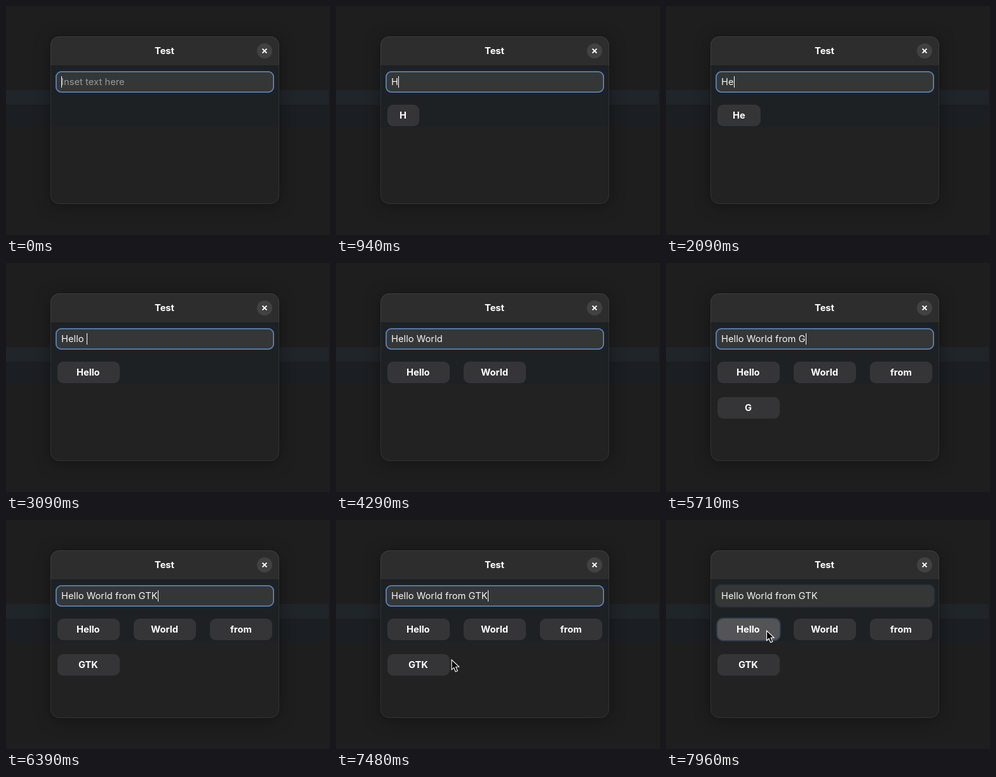
Write an HTML page with a canvas that moves like this. It is 510 px wide and 362 px high and loops after 8000 ms.

```html
<!DOCTYPE html>
<html lang="en">
<head>
<meta charset="utf-8">
<title>Test</title>
<style>
  html, body { margin: 0; width: 100%; height: 100%; overflow: hidden; background: #1e1e1e; }
  canvas { display: block; }
</style>
</head>
<body>
<canvas id="stage" width="510" height="362"></canvas>
<script>
const ctx = document.getElementById('stage').getContext('2d');
const LOOP = 8000;
const FONT = '14.67px Inter, "Noto Sans", sans-serif';
const BOLD = 'bold ' + FONT;

// Typing comes in bursts of evenly paced keys
const BURSTS = [
  { keys: 'H', start: 890, pace: 1 },
  { keys: 'ello ', start: 2090, pace: 195 },
  { keys: 'World', start: 3250, pace: 215 },
  { keys: ' fro', start: 4610, pace: 105 },
  { keys: 'm ', start: 5230, pace: 220 },
  { keys: 'GTK', start: 5710, pace: 205 },
];
const BLINKS = [30, 1720, 3980, 6390];
const BLINK_STEP = 300;
const POINTER_IN = 7300, HOVER = 7580, CLICK = 7830;

const clamp = v => Math.max(0, Math.min(1, v));
const ramp = (t, start, length) => clamp((t - start) / length);

function typedAt(t) {
  return BURSTS.map(({ keys, start, pace }) =>
    keys.slice(0, Math.max(0, Math.floor((t - start) / pace) + 1))).join('');
}

// Fade out, stay hidden, fade in, stay visible; a new burst shows the cursor again
function cursorAlpha(t) {
  if (t > CLICK + 20) return 0;
  const blink = BLINKS.filter(b => b <= t).pop();
  if (blink === undefined || BURSTS.some(b => b.start > blink && b.start <= t)) return 1;
  const phase = (t - blink) / BLINK_STEP % 4;
  return clamp(Math.abs(phase - 1.5) - .5);
}

function rect(x, y, w, h, color) {
  ctx.fillStyle = color;
  ctx.fillRect(x, y, w, h);
}

function roundRect(x, y, w, h, r, color) {
  ctx.beginPath();
  ctx.roundRect(x, y, w, h, r);
  ctx.fillStyle = color;
  ctx.fill();
}

function outline(x, y, w, h, r, color, line) {
  const d = line / 2;
  ctx.beginPath();
  ctx.roundRect(x + d, y + d, w - line, h - line, r - d);
  ctx.strokeStyle = color;
  ctx.lineWidth = line;
  ctx.stroke();
}

function focusRing(x, y, w, h, grow, alpha) {
  const color = `rgba(88, 130, 187, ${alpha})`;
  outline(x - grow, y - grow, w + 2 * grow, h + 2 * grow, 9 + grow, color, 1.8);
}

function setFont(font) {
  ctx.font = font;
  ctx.letterSpacing = font === FONT ? '0.05px' : '0px';
}

function width(str, font) {
  setFont(font);
  return ctx.measureText(str).width;
}

function text(str, x, y, font, color) {
  setFont(font);
  ctx.fillStyle = color;
  ctx.fillText(str, x, y);
}

function label(str, center, y) {
  text(str, Math.floor(center - width(str, BOLD) / 2), y, BOLD, '#ffffff');
}

function drawDesktop() {
  rect(0, 0, 510, 362, '#1e1e1e');
  rect(0, 133, 508, 23, '#20252a');
  rect(0, 156, 508, 36, '#1b1e22');
}

function drawWindow() {
  ctx.save();
  ctx.shadowColor = 'rgba(0, 0, 0, .35)';
  ctx.shadowBlur = 26;
  ctx.shadowOffsetY = 3;
  roundRect(70, 48, 360, 265, 14, '#222222');
  ctx.restore();

  roundRect(70, 48, 360, 46, [14, 14, 0, 0], '#2d2d2e');
  rect(70, 94, 360, 98, '#1e2124');
  rect(70, 94, 360, 1, '#1a1c1e');
  outline(70, 48, 360, 265, 14, 'rgba(255, 255, 255, .08)', 1);
  label('Test', 250, 76);

  roundRect(395, 59, 24, 24, 12, '#424243');
  ctx.beginPath();
  for (const s of [-3.4, 3.4]) {
    ctx.moveTo(407 - s, 71 - 3.4);
    ctx.lineTo(407 + s, 71 + 3.4);
  }
  ctx.strokeStyle = '#ffffff';
  ctx.lineWidth = 2;
  ctx.stroke();
}

function drawEntry(t, typed, blur) {
  roundRect(78, 103, 344, 34, 9, '#353736');
  focusRing(78, 103, 344, 34, 2.5 * blur, (1 - blur) ** 2);
  text(typed || 'Inset text here', 87, 125, FONT, typed ? '#f4f4f4' : '#989a99');
  const x = 87 + Math.round(width(typed, FONT));
  rect(x, 111, 1, 18, `rgba(255, 255, 255, ${cursorAlpha(t)})`);
}

// Equal cells: as many per row as the widest word allows
function drawButtons(t, typed, focus) {
  const words = typed.split(' ').filter(Boolean);
  const widest = Math.max(0, ...words.map(w => width(w, BOLD)));
  const cols = Math.floor(360 / (widest + 56));
  const cell = 360 / cols;
  const lit = 11 * ramp(t, HOVER, 200) + 20 * ramp(t, CLICK, 100);
  words.forEach((word, i) => {
    const x = 81 + i % cols * cell;
    const y = 156 + Math.floor(i / cols) * 56;
    const w = cell - 22;
    const gray = 53 + (i ? 0 : lit);
    roundRect(x, y, w, 34, 9, `rgb(${gray}, ${gray}, ${gray + 2})`);
    if (!i && focus) focusRing(x, y, w, 34, 3 - 2 * focus, focus ** 3);
    label(word, x + w / 2, y + 22);
  });
}

function drawPointer(t) {
  if (t < POINTER_IN) return;
  const left = (1 - ramp(t, POINTER_IN, 450)) ** 2;
  ctx.save();
  ctx.translate(158 + 66 * left, 174.5 + 129 * left);
  ctx.scale(.94, .94);
  const arrow = new Path2D('M.5.5V17l3.8-3.4L7 20.3l3.3-1.3-2.8-6.6 5.3-.2z');
  ctx.fillStyle = '#000000';
  ctx.fill(arrow);
  ctx.strokeStyle = '#ffffff';
  ctx.lineWidth = 1.2;
  ctx.stroke(arrow);
  ctx.restore();
}

function draw(now) {
  const t = now % LOOP;
  const typed = typedAt(t);
  const focus = ramp(t, CLICK, 200);
  drawDesktop();
  drawWindow();
  drawEntry(t, typed, focus);
  drawButtons(t, typed, focus);
  drawPointer(t);
}

const start = performance.now();
function tick() {
  draw(performance.now() - start);
  requestAnimationFrame(tick);
}
tick();
</script>
</body>
</html>
```
